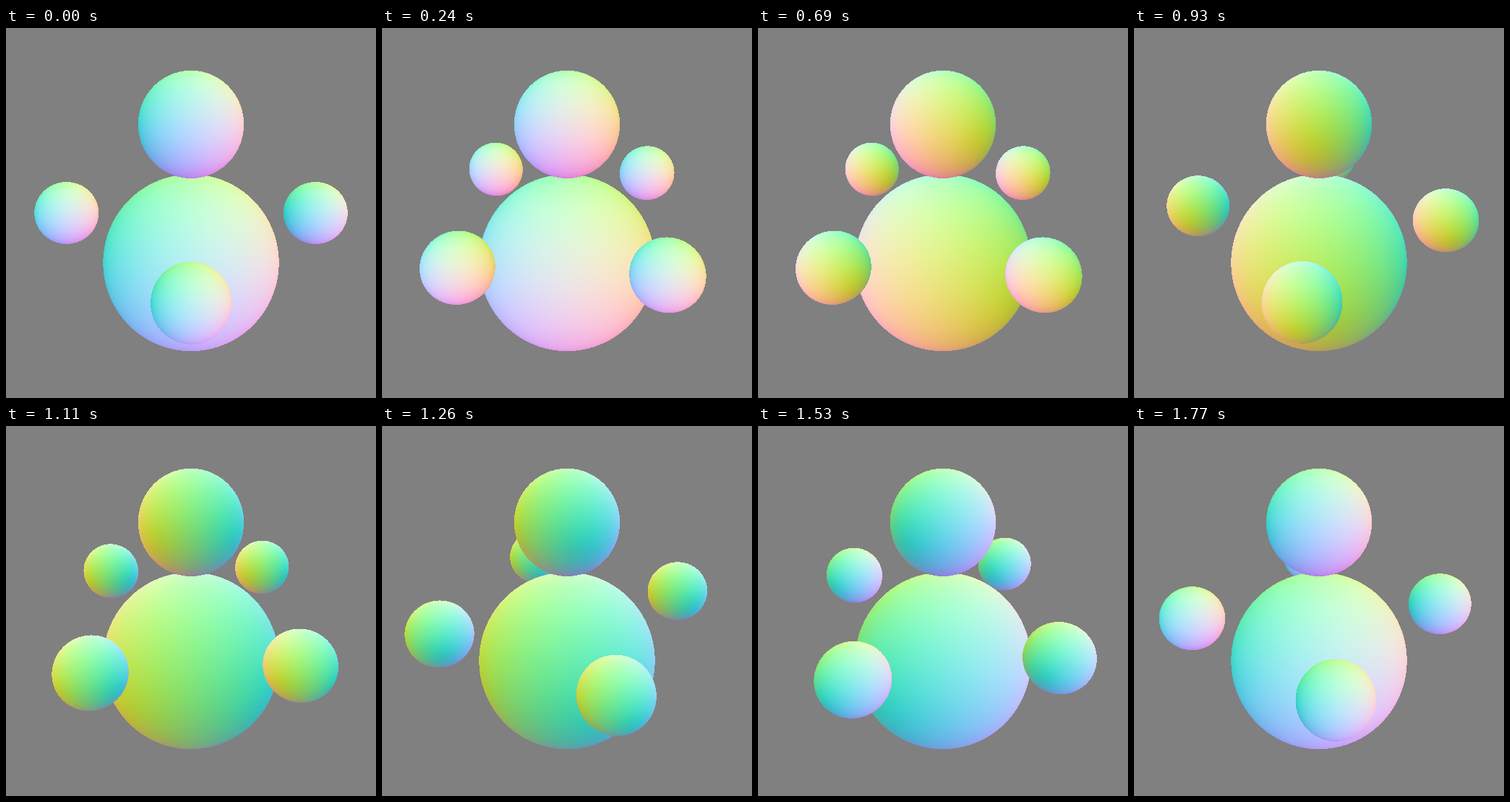
An HTML page with a canvas that plays this animation: 512x512 px, repeating every 1800 ms.

```html
<!DOCTYPE html>
<html lang="en">
<head>
<meta charset="utf-8">
<title>Orbiting spheres</title>
<style>
  html, body { margin: 0; width: 100%; height: 100%; overflow: hidden; background: #808080; }
  canvas { display: block; width: 100vw; height: 100vh; }
</style>
</head>
<body>
<canvas id="stage" width="512" height="512"></canvas>
<script>
const SIZE = 512, HALF = SIZE / 2;
const LOOP = 1800, STEP = 30;
const FOCAL = HALF / Math.tan(Math.PI / 8);   // 45 degree field of view

// Camera at (0, 2, 3), looking at the origin
const DIST = Math.hypot(2, 3);
const SIN = 2 / DIST, COS = 3 / DIST;

const ctx = document.getElementById('stage').getContext('2d');
const image = ctx.createImageData(SIZE, SIZE);
const pixels = new Uint32Array(image.data.buffer);
const GREY = 0xff808080;

// Normal component (-1..1) to a gamma corrected channel
const LEVELS = 2048;
const channel = (base, gain) => Uint8Array.from({ length: LEVELS + 1 }, (_, i) => {
  const n = i / LEVELS * 2 - 1;
  const light = Math.min(1, Math.max(0, base + gain * n));
  return Math.round(255 * Math.pow(light, 1 / 2.2));
});
const sideTone = channel(0.515, 0.485);
const upTone = channel(0.58, 0.45);
const level = n => Math.max(0, Math.min(LEVELS, (n + 1) * LEVELS / 2 + 0.5 | 0));

// Sphere in camera space: x right, y up, z towards the viewer
function sphere(x, y, z, r) {
  const cy = COS * y - SIN * z;
  const cz = SIN * y + COS * z - DIST;
  return { x, y: cy, z: cz, r, power: x * x + cy * cy + cz * cz - r * r };
}

// Screen extent of a sphere along one axis
function extent(c, depth, r) {
  const mid = Math.atan2(c, depth);
  const half = Math.asin(r / Math.hypot(c, depth));
  return [FOCAL * Math.tan(mid - half), FOCAL * Math.tan(mid + half)];
}

function drawSphere(s, sinTurn, cosTurn) {
  const [left, right] = extent(s.x, -s.z, s.r);
  const [low, high] = extent(s.y, -s.z, s.r);
  const x0 = Math.max(0, Math.floor(HALF + left)), x1 = Math.min(SIZE - 1, Math.ceil(HALF + right));
  const y0 = Math.max(0, Math.floor(HALF - high)), y1 = Math.min(SIZE - 1, Math.ceil(HALF - low));

  for (let py = y0; py <= y1; py++) {
    const dy = HALF - py - 0.5;
    for (let px = x0; px <= x1; px++) {
      const dx = px + 0.5 - HALF;
      const a = dx * dx + dy * dy + FOCAL * FOCAL;
      const b = dx * s.x + dy * s.y - FOCAL * s.z;
      const disc = b * b - a * s.power;
      if (disc < 0) continue;
      const t = (b - Math.sqrt(disc)) / a;
      const nx = (t * dx - s.x) / s.r;
      const ny = (t * dy - s.y) / s.r;
      const nz = (-t * FOCAL - s.z) / s.r;
      const up = COS * ny + SIN * nz;
      const front = COS * nz - SIN * ny;
      const red = sideTone[level(nx * cosTurn + front * sinTurn)];
      const green = upTone[level(up)];
      const blue = sideTone[level(front * cosTurn - nx * sinTurn)];
      pixels[py * SIZE + px] = 0xff000000 | blue << 16 | green << 8 | red;
    }
  }
}

function draw(time) {
  const turn = time / LOOP * 2 * Math.PI;
  const spheres = [sphere(0, -0.5, 0, 0.75), sphere(0, 0.75, 0, 0.375)];
  for (let i = 0; i < 4; i++) {
    const angle = turn + i * Math.PI / 2;
    spheres.push(sphere(-Math.sin(angle), 0, Math.cos(angle), 0.25));
  }
  spheres.sort((p, q) => q.power - p.power);   // far to near

  pixels.fill(GREY);
  for (const s of spheres) drawSphere(s, Math.sin(turn), Math.cos(turn));
  ctx.putImageData(image, 0, 0);
}

let start = null, shown = -1;
function tick(now) {
  if (start === null) start = now;
  const step = Math.floor((now - start) % LOOP / STEP);
  if (step !== shown) {
    shown = step;
    draw(step * STEP);
  }
  requestAnimationFrame(tick);
}
draw(0);
requestAnimationFrame(tick);
</script>
</body>
</html>
```
